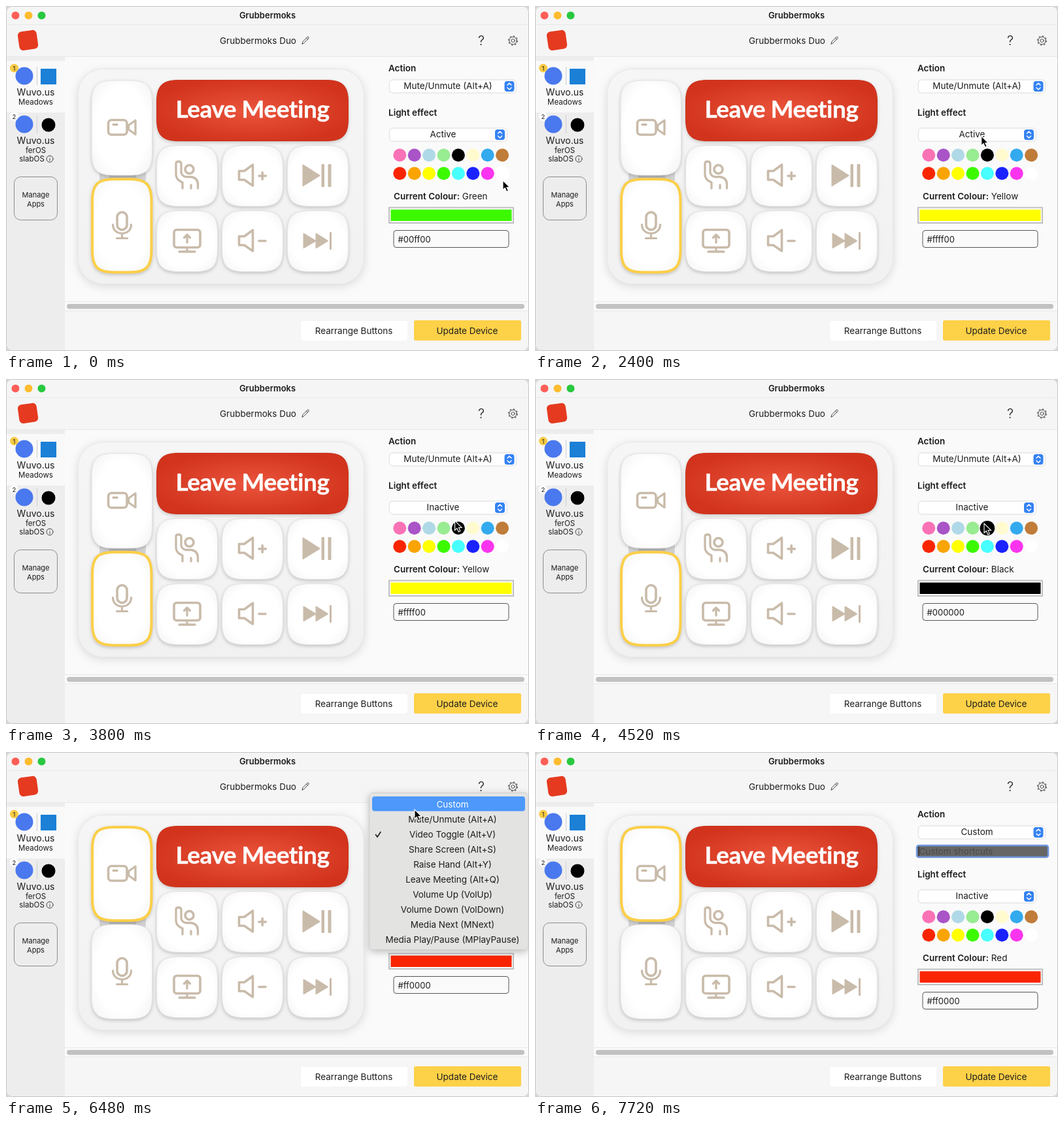
An HTML page that plays this animation: 800 by 528 pixels, repeating every 8 s.

```html
<!DOCTYPE html>
<html lang="en">
<head>
<meta charset="utf-8">
<title>Key settings</title>
<style>
html, body { margin: 0; width: 100%; height: 100%; overflow: hidden; background: #d2d2d2; }
svg { display: block; width: 800px; height: 528px; cursor: default; }
text { font-family: Inter, "Open Sans", sans-serif; font-size: 13.5px; fill: #1c1c1c; }
.mid { text-anchor: middle; }
.bold { font-weight: 600; }
.soft { filter: drop-shadow(0 .5px 1px rgba(0,0,0,.27)); }
.flat { filter: drop-shadow(0 .5px .7px rgba(0,0,0,.12)); }
.key { filter: drop-shadow(0 2.5px 2.5px rgba(60,50,50,.25)); }
.line { fill: none; stroke: #c9bbaa; stroke-width: 3.6; stroke-linecap: round; stroke-linejoin: round; }
.solid { fill: #c9bbaa; stroke: #c9bbaa; stroke-width: 2; stroke-linejoin: round; }
.thin { fill: none; stroke: #444; stroke-width: 1; stroke-linecap: round; stroke-linejoin: round; }
.small { font-size: 11.5px; }
</style>
</head>
<body>
<svg id="stage" viewBox="0 0 800 528">
  <defs>
    <radialGradient id="red" cx=".5" cy=".5" r=".55">
      <stop offset="0" stop-color="#ea543c"/><stop offset="1" stop-color="#d2331c"/>
    </radialGradient>
    <linearGradient id="board" x2="0" y2="1">
      <stop offset="0" stop-color="#f6f6f6"/><stop offset="1" stop-color="#f1f1f1"/>
    </linearGradient>
    <radialGradient id="cap" r=".72">
      <stop offset=".6" stop-color="#fff"/><stop offset="1" stop-color="#f1f1f1"/>
    </radialGradient>
    <clipPath id="win"><rect width="800" height="528" rx="9"/></clipPath>
  </defs>

  <g clip-path="url(#win)">
    <rect width="800" height="528" fill="#fafafa"/>
    <rect width="800" height="77" fill="#f5f5f5"/>
    <rect y="77" width="90" height="451" fill="#ededed"/>
    <rect y="84" width="90" height="79" fill="#f9f9f9"/>
    <rect x="90" y="466" width="710" height="62" fill="#f6f6f6"/>
    <path d="M0 28.5H800M0 77.5H800M90 452.5H800M90 466.5H800" stroke="#e8e8e8"/>
    <rect x="93" y="456" width="700" height="7.5" rx="3.7" fill="#c1c1c1"/>

    <circle cx="14.5" cy="14.5" r="6" fill="#fe5f57"/>
    <circle cx="34.5" cy="14.5" r="6" fill="#febc2e"/>
    <circle cx="54.5" cy="14.5" r="6" fill="#28c840"/>
    <text class="mid bold" x="400" y="18.5" style="font-size:13px">Grubbermoks</text>
    <text class="mid" x="385.5" y="58">Grubbermoks Duo</text>
    <path class="thin" d="M453 58l1-3.500 7-7q1.200-.8 2 0t0 2l-7 7zM459.500 49l2 2"/>
    <text class="mid" x="727" y="60" style="font-size:20px;font-weight:300">?</text>
    <g class="thin">
      <circle cx="775.500" cy="53" r="5.700"/><circle cx="775.500" cy="53" r="2.500"/>
      <circle cx="775.500" cy="53" r="6.900" stroke-width="1.600" stroke-linecap="butt" stroke-dasharray="2.700 2.719" stroke="#777"/>
    </g>
    <rect x="19" y="38" width="29" height="29" rx="6" fill="#e53a20" transform="rotate(-8 33 52)"/>

    <g id="apps"></g>
    <rect x="12.500" y="261.500" width="66" height="66" rx="10" fill="none" stroke="#8c8c8c"/>
    <text class="mid" x="45.500" y="293" style="font-size:11px">Manage</text>
    <text class="mid" x="45.500" y="306.500" style="font-size:11px">Apps</text>

    <rect x="110.500" y="96.500" width="437" height="329" rx="38" fill="url(#board)" stroke="#e6e6e6"
      style="filter:drop-shadow(0 3px 7px rgba(0,0,0,.13))"/>
    <path d="M143 254H214V264Q214 269 208 269H149Q143 269 143 264Z" fill="#d4d4d4"/>
    <path d="M158 254H199V269H158Z" fill="#bdbdbd"/>
    <g id="keys"></g>
    <text class="mid" x="377" y="170.500" style="font:700 37px Lato,sans-serif;letter-spacing:-.5px;fill:#fff;stroke:#fff;stroke-width:.4;stroke-linejoin:round">Leave Meeting</text>

    <g class="line">
      <rect x="156.500" y="174.500" width="28.500" height="22.500" rx="5"/>
      <path d="M164 181.500H170M187.500 182.500L198 175V196.500L187.500 189Z" stroke-width="3.300"/>
      <rect x="170" y="315.500" width="15" height="27" rx="7.500"/>
      <path d="M163.500 334.500C163.500 352.500 191.500 352.500 191.500 334.500M177.500 349V355.500M169.500 355.500H185.500" stroke-width="3.200"/>
      <circle cx="280.500" cy="250" r="6.500"/>
      <path d="M270 279V270Q260 266 260 258V241Q260 238 264 238T268 242V255Q269 260 275 261.500H283Q293.500 263 293.500 273V279M283 279V274" stroke-width="3.300"/>
      <rect x="257" y="342.500" width="40" height="27" rx="4"/>
      <path d="M277 372V376M265 376H289M277 362V350.500M272.500 354.500L277 350 281.500 354.500" stroke-width="3.300"/>
      <path d="M356.500 252.500H364.500L377.500 243V275L364.500 266H356.500ZM387 260H397.500M392.200 254.700V265.300"/>
      <path d="M356.500 352.500H364.500L377.500 343V375L364.500 366H356.500ZM387 359.500H397"/>
    </g>
    <g class="solid">
      <path d="M454.500 243.500L479.500 259.500 454.500 275ZM483.500 243H486V276H483.500ZM493.500 243H496.500V276H493.500Z"/>
      <path d="M455.500 348.500L473.500 359.500 455.500 370ZM474.500 348.500L492 359.500 474.500 370ZM496 347H497V372H496Z"/>
    </g>

    <text class="bold" x="585" y="99.500">Action</text>
    <g class="soft"><rect x="587" y="113.500" width="193" height="19" rx="5" fill="#fff"/></g>
    <text class="mid" id="action" x="676" y="127"></text>
    <g class="step" transform="translate(770 123)"></g>

    <g id="field">
      <rect x="584.500" y="143.500" width="200" height="17" rx="2" fill="#666"/>
      <rect id="ring" x="584" y="143" width="201" height="18" rx="3" fill="none" stroke="#6f97e0" stroke-width="2.500"/>
      <text x="587.500" y="157" style="fill:#4b4b4b">Custom shortcuts</text>
      <path id="caret" d="M587 145V159" stroke="#111"/>
    </g>

    <g id="lower">
      <text class="bold" x="585" y="167.500">Light effect</text>
      <g class="soft"><rect id="lightBox" x="587" y="187.500" width="179" height="19" rx="5"/></g>
      <text class="mid" id="light" x="668.500" y="201"></text>
      <g class="step" transform="translate(755.500 197)"></g>
      <g id="swatches"></g>
      <text x="593" y="296"><tspan class="bold">Current Colour:</tspan> <tspan id="name"></tspan></text>
      <rect x="586" y="308.500" width="190" height="23.500" fill="#fff" stroke="#c0c0c0" stroke-width="2"/>
      <rect id="well" x="588.500" y="311.500" width="185" height="17.500"/>
      <rect x="593" y="343.500" width="176" height="26" rx="4" fill="#fafafa" stroke="#555"/>
      <text id="hex" x="599.500" y="361.500" style="font-size:13px"></text>
    </g>

    <g class="flat">
      <rect x="450.500" y="481.500" width="163.500" height="30.500" rx="3" fill="#fff"/>
      <rect x="624" y="481" width="164" height="31" rx="3" fill="#fdd148"/>
    </g>
    <text class="mid" x="532" y="502">Rearrange Buttons</text>
    <text class="mid" x="705.500" y="502">Update Device</text>

    <g id="menus"></g>
    <path id="cursor" d="M0 0V14.500L3.300 11.500 5.700 17 8.300 15.900 6 10.500H10.500Z" fill="#000" stroke="#fff" stroke-width="1.100"/>
    <rect x=".5" y=".5" width="799" height="527" rx="9" fill="none" stroke="#c4c4c4"/>
  </g>
</svg>

<script>
const LOOP = 8000;
const $ = id => document.getElementById(id);
const set = (el, attrs) => { for (const k in attrs) el.setAttribute(k, attrs[k]); return el; };
const make = (tag, parent, attrs, text) => {
  const el = set(document.createElementNS('http://www.w3.org/2000/svg', tag), attrs);
  if (text) el.textContent = text;
  return parent.appendChild(el);
};
const show = (el, on) => el.style.display = on ? '' : 'none';
const clamp = v => Math.max(0, Math.min(1, v));
const ease = v => v * v * (3 - 2 * v);

// Sidebar
function addApp(y, badge, tint, markTint, round, lines) {
  const g = $('apps');
  make('circle', g, { cx: 28, cy: y, r: 13.5, fill: '#4a78ee' });
  make('path', g, { d: `M47.5 ${y - 14}v28`, stroke: '#cfcfcf' });
  if (round) make('circle', g, { cx: 65, cy: y + 1, r: 10.5, fill: markTint });
  else make('rect', g, { x: 53, y: y - 11, width: 24, height: 24, fill: markTint });
  make('circle', g, { cx: 12.5, cy: y - 12, r: 6.5, fill: tint });
  make('text', g, { class: 'mid', x: 12.5, y: y - 8.5, style: 'font-size:9.5px' }, badge);
  make('text', g, { class: 'mid', x: 45.5, y: y + 30, style: 'font-size:14px' }, 'Wuvo.us');
  lines.forEach((s, i) => make('text', g, { class: 'mid small', x: 45.5 - 6 * i, y: y + 43.5 + 13.5 * i }, s));
}
addApp(107, '1', '#f7cb45', '#1b80d6', false, ['Meadows']);
addApp(181, '2', '#fff', '#000', true, ['ferOS', 'slabOS']);
make('circle', $('apps'), { class: 'thin', cx: 67, cy: 234, r: 5 });
make('path', $('apps'), { class: 'thin', d: 'M67 233.500v3.200M67 231.200v.1' });

// Key caps with continuous corners
function squircle(x, y, w, h, r = 34) {
  const k = r * .25;
  return `M${x} ${y + r}C${x} ${y + k} ${x + k} ${y} ${x + r} ${y}h${w - 2 * r}` +
    `c${r - k} 0 ${r} ${k} ${r} ${r}v${h - 2 * r}c0 ${r - k} ${-k} ${r} ${-r} ${r}h${2 * r - w}` +
    `c${k - r} 0 ${-r} ${-k} ${-r} ${-r}z`;
}
function addKey(x, y, w, h, fill = 'url(#cap)', stroke = '#e4e4e4') {
  const g = make('g', $('keys'), { class: 'key' });
  make('path', g, { d: squircle(x, y, w, h), fill, stroke });
  return make('path', g, { d: squircle(x + 1, y + 1, w - 2, h - 2, 33), fill: 'none',
    stroke: '#fbcf48', 'stroke-width': 4 });
}
const videoKey = addKey(131, 114, 92.5, 145);
const micKey = addKey(131, 264, 92.5, 144.5);
for (const y of [213.5, 313.5])
  for (const x of [230.5, 330.5, 430.5]) show(addKey(x, y, 93, 93), false);
show(addKey(230.5, 113.5, 293, 93, 'url(#red)', '#cb301a'), false);

document.querySelectorAll('.step').forEach(g => {
  make('rect', g, { x: -7.5, y: -8, width: 15, height: 16, rx: 4, fill: '#3582f2' });
  make('path', g, { d: 'M-3 -2L0 -5 3 -2M-3 2L0 5 3 2', fill: 'none', stroke: '#fff', 'stroke-width': 1.5,
    'stroke-linecap': 'round', 'stroke-linejoin': 'round' });
});

const tints = ['#f972b6', '#a954c7', '#b0d9e7', '#98ec91', '#000', '#fffbcf', '#33aaee', '#c07c39',
  '#f92500', '#f9a400', '#ffff00', '#3cf900', '#47ffff', '#1a22ff', '#fb35ef', '#fff'];
const swatches = tints.map((fill, i) => {
  const x = 602.3 + 22.4 * (i % 8), y = i < 8 ? 228.3 : 256.3;
  return { x, y, el: make('circle', $('swatches'), { cx: x, cy: y, r: 10, fill }) };
});

// Pop-up menus: x, y, width, labels, ticked row, opening and closing time
function addMenu(x, y, w, labels, ticked, open, close) {
  const g = make('g', $('menus'), {});
  make('rect', g, { x, y, width: w, height: labels.length * 23 + 10, rx: 6, fill: '#e3e3e2', stroke: '#cbcbcb',
    'stroke-width': .7, style: 'filter:drop-shadow(0 3px 6px rgba(0,0,0,.25))' });
  const bar = make('rect', g, { x: x + 4, width: w - 9, height: 22.5, rx: 4, fill: '#4d98fa' });
  const rows = labels.map((s, i) =>
    make('text', g, { class: 'mid', x: x + w / 2 + 5.5, y: y + 22 + 23 * i }, s));
  const tick = make('path', g, { class: 'thin', d: `M${x + 9.5} ${y + 18 + 23 * ticked}l2.500 3.500 5-7.500` });
  tick.style.strokeWidth = 1.7;
  return t => {
    const alpha = t < open ? 0 : 1 - clamp((t - close) / 180);
    show(g, alpha > 0);
    if (!alpha) return;
    g.style.opacity = alpha;
    const at = Math.floor((place(Math.min(t, close))[1] - y - 5) / 23);
    const hot = Math.max(0, Math.min(labels.length - 1, at));
    set(bar, { y: y + 5.5 + 23 * hot });
    rows.forEach((r, i) => r.style.fill = i === hot ? '#fff' : '');
    tick.style.stroke = hot === ticked ? '#fff' : '#222';
  };
}
const menus = [
  addMenu(632, 160, 186, ['Inactive', 'Active'], 1, 2480, 2960),
  addMenu(556, 62.5, 243, ['Custom', 'Mute/Unmute (Alt+A)', 'Video Toggle (Alt+V)', 'Share Screen (Alt+S)',
    'Raise Hand (Alt+Y)', 'Leave Meeting (Alt+Q)', 'Volume Up (VolUp)', 'Volume Down (VolDown)',
    'Media Next (MNext)', 'Media Play/Pause (MPlayPause)'], 2, 6160, 6800)
];

// Pointer moves: start, end, x, y, bow of the path
const moves = [
  [840, 1320, 687, 262, 0], [1560, 1840, 647, 258, 0], [2080, 2440, 684, 197, 0],
  [2600, 2900, 682, 175, 0], [3360, 3900, 687, 221, 0], [4560, 5080, 186, 200, 0],
  [5240, 6080, 630, 118, -60], [6240, 6470, 625, 88, 0], [6980, 7320, 640, 153, 0]
];
function place(t) {
  let x = 760, y = 267;
  for (const [a, b, tx, ty, bow] of moves) {
    if (t < a) break;
    const e = ease(clamp((t - a) / (b - a)));
    x += (tx - x) * e;
    y += (ty - y) * e + bow * 4 * e * (1 - e);
  }
  return [x, y];
}

// Chosen colour: time, name, swatch, code
const picks = [[0, 'Green', 11, '#00ff00'], [1340, 'Cyan', 12, '#00ffff'], [1960, 'Yellow', 10, '#ffff00'],
  [4320, 'Black', 4, '#000000'], [5160, 'Red', 8, '#ff0000']];

function draw(t) {
  const [x, y] = place(t);
  const video = t >= 5160, custom = t >= 6880;
  const [, name, tint, code] = picks.filter(p => p[0] <= t).pop();

  show(videoKey, video);
  show(micKey, !video);
  $('action').textContent = custom ? 'Custom' : video ? 'Video Toggle (Alt+V)' : 'Mute/Unmute (Alt+A)';
  $('light').textContent = t < 2960 ? 'Active' : 'Inactive';
  set($('lightBox'), { fill: t >= 2440 && t < 3240 ? '#eeeeee' : '#fff' });
  $('name').textContent = name;
  $('hex').textContent = code;
  set($('well'), { fill: tints[tint] });

  const shift = custom ? 24 : 0;
  set($('lower'), { transform: `translate(0 ${shift})` });
  show($('field'), custom);
  show($('ring'), t >= 7400);
  show($('caret'), t >= 7720);

  for (const s of swatches) set(s.el, { r: Math.hypot(x - s.x, y - s.y - shift) < 11 ? 11.3 : 10 });
  menus.forEach(m => m(t));
  set($('cursor'), { transform: `translate(${x.toFixed(2)} ${y.toFixed(2)})` });
  show($('cursor'), t < 7320);
}

function tick() {
  draw(performance.now() % LOOP);
  requestAnimationFrame(tick);
}
tick();
</script>
</body>
</html>
```
